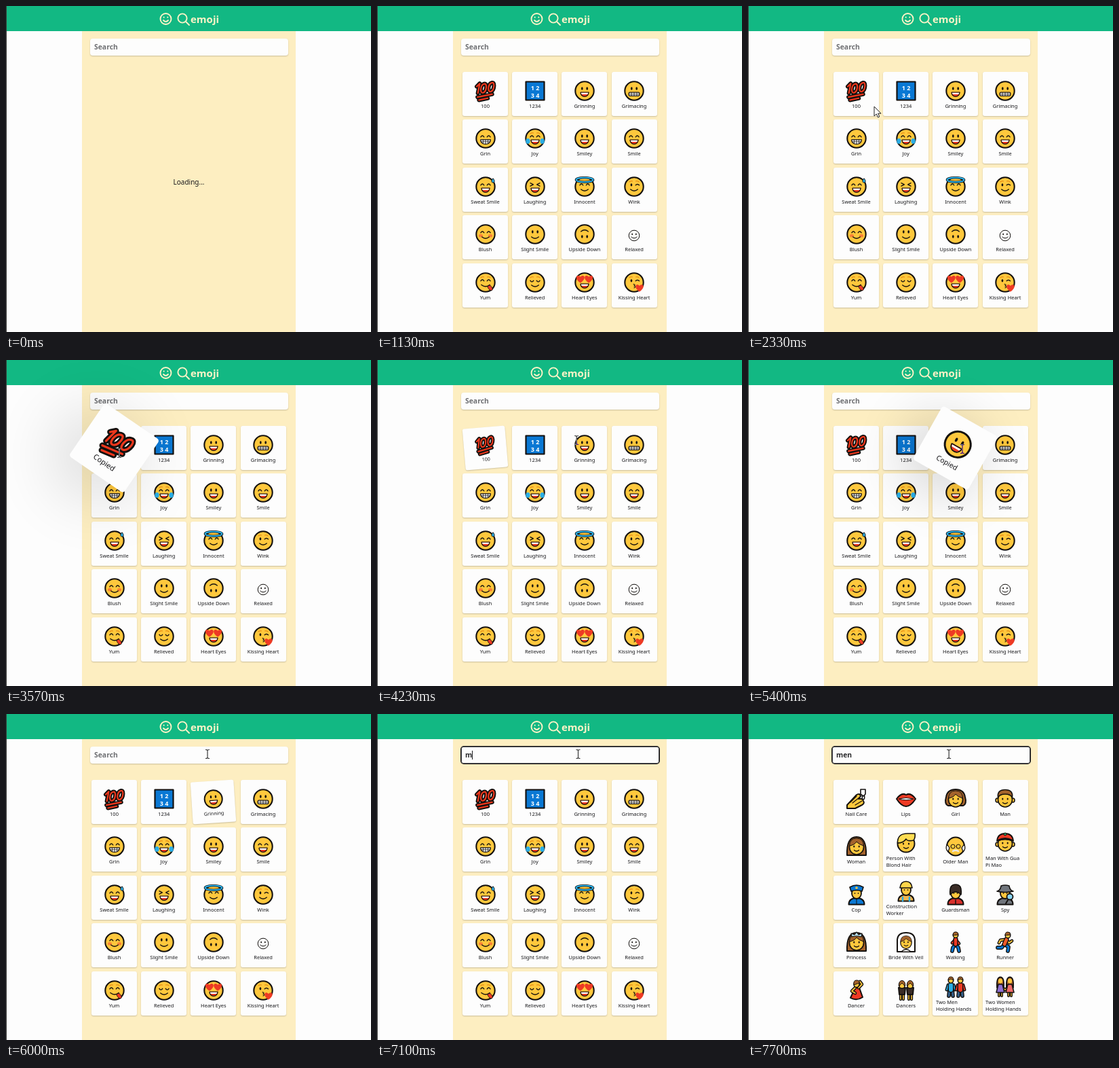
An HTML page that plays this animation: 538x480 px, repeating every 8 s.

```html
<!DOCTYPE html>
<html lang="en">
<head>
<meta charset="utf-8">
<title>Emoji search</title>
<style>
html, body { margin: 0; width: 100%; height: 100%; overflow: hidden; background: #fdfdfd; }
body { position: relative; font-family: "Noto Sans", "Open Sans", sans-serif; color: #17171a; }
body div, body > svg { position: absolute; }
#edge { left: 0; top: 0; width: 1px; height: 480px; background: #3a3a38; }
#header { left: 0; top: 0; width: 538px; height: 37px; background: #12b883; }
#column { left: 112px; top: 37px; width: 315px; height: 443px; background: #fdeec1; }
#search { left: 124px; top: 48px; width: 292px; height: 25px; border-radius: 4px; background: #fdfdfd;
  box-shadow: 0 1px 2px rgba(0,0,0,.2); font: 600 10.4px/25px "Noto Sans", "Open Sans", sans-serif; }
#search.focus { box-shadow: 0 0 0 1px #17171a, inset 0 0 0 .8px #17171a; }
#query { left: 6px; top: 0; white-space: pre; }
#caret { top: 6px; width: 1px; height: 13px; background: #17171a; }
#loading { left: 112px; width: 315px; top: 252px; text-align: center; font-size: 10px; line-height: 14px; }
.card { width: 67px; height: 65px; box-sizing: border-box; padding-top: 2px; border-radius: 3px; background: #fdfdfd;
  display: flex; flex-direction: column; align-items: center; justify-content: center; }
.card { box-shadow: 0 1px 2px rgba(0,0,0,.2); }
.card svg { width: 32px; height: 32px; margin-bottom: 1px; flex: none; overflow: visible; }
.card span { font-size: 7.5px; line-height: 10px; white-space: nowrap; }
.card .wide { width: 58px; }
#ibeam { mix-blend-mode: difference; }
#arrow, #ibeam { left: 0; top: 0; z-index: 5; overflow: visible; }
</style>
</head>
<body>
<div id="header"></div>
<svg width="538" height="37" fill="none" stroke="#fef3c7" stroke-width="1.9" stroke-linecap="round">
  <circle cx="235.5" cy="19" r="8"/>
  <path d="M232.7 16.5v.2M238.3 16.5v.2M232 21q3.5 4 7 0"/>
  <circle cx="260" cy="18" r="6.6"/><path d="M265 23l5 5"/>
  <text x="272" y="25" fill="#fef3c7" stroke="none" font-size="15" font-weight="700" font-family="Noto Sans, Open Sans, sans-serif">emoji</text>
</svg>
<div id="column"></div>
<div id="search"><div id="query"></div><div id="caret"></div></div>
<div id="loading">Loading...</div>
<div id="faces"></div>
<div id="people"></div>
<div id="edge"></div>
<svg id="arrow" width="12" height="18"><path d="M0 0V14L3.3 11L5.6 16L7.8 15L5.6 10.2H10z" fill="#fff" stroke="#222" stroke-linejoin="round"/></svg>
<svg id="ibeam" width="1" height="1"><path d="M-3-6.5Q0-6.5 0-5Q0-6.5 3-6.5M0-5V5M-3 6.5Q0 6.5 0 5Q0 6.5 3 6.5" fill="none" stroke="#c4c4c4" stroke-width="1.2"/></svg>
<script>
const $ = id => document.getElementById(id);
const LOOP = 8000;
const ink = '#14110f', gold = '#ffc83d', skin = gold, brown = '#a4632c', dark = '#3a2c26';
const red = '#ee3a24', sky = '#2aaee6', navy = '#0a78d4', white = '#fff';

// Drawing helpers, all centred on 0,0 in a 32 unit box.
const line = (d, color = ink, w = 1.6) => `<path d="${d}" fill="none" stroke="${color}" stroke-width="${w}" stroke-linecap="round" stroke-linejoin="round"/>`;
const shape = (d, fill, w = 1.6) => `<path d="${d}" fill="${fill}" stroke="${ink}" stroke-width="${w}" stroke-linejoin="round"/>`;
const oval = (x, y, rx, ry, fill = ink, w = 0) => `<ellipse cx="${x}" cy="${y}" rx="${rx}" ry="${ry}" fill="${fill}" stroke="${ink}" stroke-width="${w}"/>`;
const limb = (d, color, w = 3) => line(d, ink, w + 2.8) + line(d, color, w);
const group = (transform, body) => `<g transform="${transform}">${body}</g>`;
const heart = (x, y, s = 1) => group(`translate(${x} ${y}) scale(${s})`, `<path d="M0 5C-9-1-4-7 0-2.5C4-7 9-1 0 5z" fill="${red}"/>`);

const face = (...parts) => oval(0, 0, 13.7, 13.7, gold, 2.1) + group('scale(.88)', parts.join(''));
const eyes = oval(-4.2, -4, 1.5, 2.6) + oval(4.2, -4, 1.5, 2.6);
const arcs = line('M-8-2.5q2.7-4 5.4 0M2.6-2.5q2.7-4 5.4 0');
const lids = line('M-8-3q2.7 4 5.4 0M2.6-3q2.7 4 5.4 0');
const brows = line('M-8-8q3-2 5-1M8-8q-3-2-5-1', '#e8860c', 1.3);
const smile = line('M-6 4.5Q0 9.5 6 4.5');
const laugh = shape('M-7 2.5H7Q6 9.5 0 9.5T-7 2.5', red, 1.4) + `<path d="M-6 3.2H6L5 5.6H-5z" fill="#fff"/>`;
const teeth = shape('M-8.5 2H8.5Q8 9.5 0 9.5T-8.5 2', white, 1.4) + line('M-7.5 5.5H7.5M-4 2.5V8.5M0 2.5V9M4 2.5V8.5', ink, .9);
const wink = oval(-4.6, -3, 1.5, 2.5) + line('M2.5-2.5q3-3 6 0');
const cheeks = oval(-8, 2.5, 3.4, 2.6, '#fb8136') + oval(8, 2.5, 3.4, 2.6, '#fb8136');
const drop = (x, y) => shape(`M${x} ${y}q5 6 0 7.5q-5-1.5 0-7.5z`, sky, 1);
const numeral = 'M-12-6l4-4-2.5 13M-2-9.5q-4 1-4.500 7.500q0 5 3 4.500q4-1 4.500-8q0-5-3-4M8.500-11q-4 1-4.500 7.500q0 5 3 4.500q4-1 4.500-8q0-5-3-4M-11 8.500L9 4.500M-9 12.500L3 10';
const digits = (y, s) => `<text y="${y}" text-anchor="middle" font-size="9" font-weight="600" fill="#fff">${s}</text>`;

const faces = [
  ['100', group('scale(1.08)', line(numeral, ink, 5.6) + line(numeral, '#f0371c', 2))],
  ['1234', shape('M-13.5-13.5H13.5V13.5H-13.5z', navy, 2.2) + digits(-1, '1 2') + digits(9.5, '3 4')],
  ['Grinning', face(eyes, laugh)],
  ['Grimacing', face(eyes, shape('M-7 2.5H7Q9 2.5 9 5.5T7 8.5H-7Q-9 8.5-9 5.5T-7 2.5z', white, 1.4), line('M-8 5.5H8M-4.5 3V8M0 3V8M4.5 3V8', ink, .9))],
  ['Grin', face(arcs, teeth)],
  ['Joy', face(brows, arcs, laugh, oval(-12, 4.5, 3.6, 4.4, sky), oval(12, 4.5, 3.6, 4.4, sky))],
  ['Smiley', face(eyes, laugh)],
  ['Smile', face(arcs, laugh)],
  ['Sweat Smile', face(arcs, laugh, drop(12.5, -14))],
  ['Laughing', face(line('M-8-6l5 2.5-5 2.5M8-6l-5 2.5 5 2.5'), laugh)],
  ['Innocent', face(arcs, smile) + `<ellipse cy="-10" rx="12.5" ry="3.2" fill="none" stroke="${ink}" stroke-width="3.6"/><ellipse cy="-10" rx="12.5" ry="3.2" fill="none" stroke="${sky}" stroke-width="1.9"/>`],
  ['Wink', face(brows, wink, smile)],
  ['Blush', face(cheeks, arcs, smile)],
  ['Slight Smile', face(eyes, smile)],
  ['Upside Down', group('rotate(180)', face(eyes, smile))],
  ['Relaxed', `<circle cy="2" r="7.8" fill="none" stroke="${ink}"/>` + oval(-2.8, 0, .9, 1.2) + oval(2.8, 0, .9, 1.2) + line('M-4.2 4q4.2 4 8.4 0', ink, 1)],
  ['Yum', face(brows, arcs, line('M-7 4Q0 9.5 7 4'), shape('M3 6.5L7.5 4.5Q14 11 10.5 13.5Q6 14 3 6.5z', red, 1))],
  ['Relieved', face(brows, lids, smile)],
  ['Heart Eyes', face(laugh, heart(-7, -6, 1.35), heart(7, -6, 1.35))],
  ['Kissing Heart', face(brows, wink, line('M-1 3q4 1 1 3q4 1 0 3', ink, 1.3), heart(9, 9, 1.3))]
];

const head = (hair, ...front) => hair + oval(0, 1, 10.5, 11, skin, 1.6) + oval(-3.7, 0, 1.1, 1.6) + oval(3.7, 0, 1.1, 1.6) + line('M-3.5 5.5q3.5 3 7 0', ink, 1.3) + front.join('');
const bust = (coat, ...front) => shape('M-11.5 14.5Q-11.5 5 0 5T11.5 14.5z', coat, 2) + oval(0, -2, 7, 8, skin, 1.8) + oval(-2.5, -2, .8, 1) + oval(2.5, -2, .8, 1) + front.join('');
const longHair = shape('M-14 13Q-15-14 0-14T14 13z', brown, 2);
const ears = oval(-11.5, 2, 2.5, 3, skin, 1.5) + oval(11.5, 2, 2.5, 3, skin, 1.5);
const fringe = (color = brown) => shape(`M-10.5-1Q-10-12 0-12T10.5-1Q3-3 0-7Q-3-2-10.5-1z`, color, 1);
const walker = (x, top, hair) => group(`translate(${x} 0)`,
  limb('M-2 4L-3 13M2 4L3 13', '#35608c') + limb('M-4-3L-6 4M4-3L6 4', top, 2) + limb('M0-3V4', top, 6) + oval(0, -10, 3.8, 4.2, skin, 1.5) + shape('M-3.8-10Q-4-15 0-15T3.8-10L0-12z', hair, 1));
const dress = (x, color) => group(`translate(${x} 0)`, limb('M-2 8V13M2 8V13', skin, 1.2) + shape('M-5 1Q-6-14.5 0-14.5T5 1z', brown, 1.8) + shape('M-3-4H3L6 8H-6z', color) + oval(0, -9, 3, 3.5, skin));
const dancer = x => group(`translate(${x} 0)`, limb('M-2 5V13M2 5V13', skin, 1.5) + shape('M-5-4H5L4 6H-4z', dark, 2) + oval(0, -8, 4.5, 5, skin, 1.5) + shape('M-4.5-6Q-5-14.5 0-14.5T4.5-6L0-11z', brown, 1));

const people = [
  ['Nail Care', shape('M-14 9L0-6Q5-9 6-4L3 0Q9-1 10 3Q13 7 6 10L-2 14H-14z', skin, 2) + line('M-6 6L4-2M-2 9L8 3M-9 5L0-4', ink, 1.2) + limb('M10-4V-1', '#ddd', 2) + shape('M6-7V-14H13V-7L10-4z', white)],
  ['Lips', shape('M-14 0Q-7-10 0-6Q7-10 14 0Q7 11 0 11T-14 0z', red, 2) + shape('M-11 0Q0-3 11 0Q0 3.5-11 0z', white, 1)],
  ['Girl', head(shape('M-11 10Q-17 8-14-3Q-12-14 0-14T14-3Q17 8 11 10z', brown, 2), fringe())],
  ['Man', head(ears, shape('M-10.5-2Q-12-13.5 0-13.5T10.5-2Q8-7 0-7T-10.5-2z', brown))],
  ['Woman', head(longHair, fringe())],
  ['Person With|Blond Hair', oval(0, 1, 12.5, 12.5, skin, 2) + oval(-4, 1, 1.1, 1.6) + oval(4, 1, 1.1, 1.6) + line('M-3.5 6.5q3.5 3 7 0', ink, 1.3) + shape('M-12.5 0Q-13-14 2-14H13Q14-8 11-4Q2-2 0-6Q-4 0-12.5 0z', '#ffdc52')],
  ['Older Man', oval(0, 0, 13, 13.5, skin, 2) + shape('M-12.5-3Q-16 3-11 8L-9 2zM12.5-3Q16 3 11 8L9 2z', '#eceae6', 1.2) + line('M-7 0a3 3 0 1 0 6 0a3 3 0 1 0-6 0M1 0a3 3 0 1 0 6 0a3 3 0 1 0-6 0', ink, 1) + line('M-4 7Q0 4.500 4 7', '#eceae6', 2.4)],
  ['Man With Gua|Pi Mao', head(ears, shape('M-12-3Q-11-14 0-14T12-3Q0-8-12-3z', red, 1.8), line('M-10-4Q0-9 10-4', ink, 3), oval(0, -13, 2, 2, '#2a9d5c', 1))],
  ['Cop', bust(navy, shape('M-8-5L-10-11Q0-17 10-11L8-5Q0-8-8-5z', navy), oval(0, -10, 1.8, 1.8, gold), line('M0 7V14', ink, 1))],
  ['Construction|Worker', bust('#f0b450', shape('M-9-5Q-8-14.5 0-14.5T9-5z', '#ffd54a'), line('M-5 9V14M5 9V14', sky, 2.5))],
  ['Guardsman', bust('#d9302c', shape('M-8 0Q-10-15 0-15T8 0Q4-4 0-4T-8 0z', dark), line('M0 8V14', ink, 1.5))],
  ['Spy', bust('#70757c', shape('M-12-5Q-7-6-6-13Q0-15 6-13Q7-6 12-5Q0-2-12-5z', '#70757c'), line('M4 8L1 13', ink, 2), oval(7, 3, 4.5, 4.5, '#8ad6f4', 1.8))],
  ['Princess', head(longHair, fringe(), shape('M-7-8L-8-13L-3-11L0-15L3-11L8-13L7-8Q0-10-7-8z', '#b8dfee', 1.2))],
  ['Bride With Veil', shape('M-13 14V-4Q-12-14 0-14T13-4V14z', white, 2) + group('scale(.78)', head('', fringe())) + shape('M-7 14Q0 7 7 14z', white, 1.2)],
  ['Walking', limb('M0 3L-4 8L-5 13M0 3L4 8L5 13', navy) + limb('M0-4L-5 1M0-4L5 2', red, 2) + limb('M0-4V3', red, 4.5) + oval(0, -10.5, 3.8, 4, skin, 1.5) + shape('M-3.8-10Q-4-15 0-15T3.8-11z', brown, 1)],
  ['Runner', limb('M-1 3L5 7L4 13M-1 3L-5 8L-11 8', navy) + limb('M1-4L-7-3L-9 1M1-4L6 1L10-2', skin, 2) + limb('M2-4L-1 3', '#f05a28', 4.5) + oval(4, -10, 3.8, 4, skin, 1.5) + shape('M0-10Q0-15 4-15T8-11z', brown, 1)],
  ['Dancer', shape('M-2-4H4L9 10Q0 16-9 11z', red, 2) + limb('M3-4L8-9L5-13M-2-4L-7 1L-2 4', skin, 1.8) + oval(0, -9, 4, 4.5, skin, 1.5) + shape('M-4-8Q-5-15 0-15T4-11z', brown, 1)],
  ['Dancers', dancer(-6) + dancer(6)],
  ['Two Men|Holding Hands', walker(-7, sky, brown) + walker(7, red, brown)],
  ['Two Women|Holding Hands', limb('M-5 0L0 4L5 0', skin, 1.5) + dress(-7, '#8f6fd0') + dress(7, '#ef6a6a')]
];

function fillGrid(id, items) {
  $(id).innerHTML = items.map(([label, art], i) => {
    const left = 126 + 73.2 * (i % 4), top = 97 + 70.4 * Math.floor(i / 4);
    const wide = label.includes('|') ? ' class="wide"' : '';
    return `<div class="card" style="left:${left}px;top:${top}px"><svg viewBox="-16 -16 32 32">${art}</svg><span${wide}>${label.replace('|', '<br>')}</span></div>`;
  }).join('');
}
fillGrid('faces', faces);
fillGrid('people', people);

const clamp = u => Math.min(1, Math.max(0, u));

// Underdamped spring from 0 to 1: stiffness 100, damping 10, mass 1.
function spring(ms) {
  if (ms <= 0) return 0;
  const s = ms / 1000, w = Math.sqrt(75);
  return 1 - Math.exp(-5 * s) * (Math.cos(w * s) + 5 / w * Math.sin(w * s));
}

const clicks = [
  { card: 0, copied: 3085, rise: 3250, fall: 3860 },
  { card: 2, copied: 4740, rise: 4750, fall: 5560 }
];
const typed = [[7100, 'm'], [7170, 'me'], [7250, 'men']];
const path = [[1570, 80, 0], [1900, 140, 80], [2200, 184, 142], [2330, 186, 148], [2400, 186, 148],
  [2700, 167, 137], [3870, 167, 137], [4230, 294, 118], [4400, 320, 122], [4670, 316, 131],
  [5570, 316, 131], [5950, 297, 59], [6230, 297, 59], [LOOP, 296, 59]];

const show = (id, on) => { $(id).style.visibility = on ? 'visible' : 'hidden'; };

function drawCards(t) {
  for (const { card, copied, rise, fall } of clicks) {
    const el = $('faces').children[card];
    const k = spring(t - rise) - spring(t - fall);
    const lift = Math.max(0, k);
    el.style.transform = Math.abs(k) > .002 ? `rotate(${30 * k}deg) scale(${1 + .4 * k})` : 'none';
    el.style.zIndex = lift > .002 ? 2 : 0;
    el.style.boxShadow = `${-8 * lift}px ${1 + 13 * lift}px ${2 + 58 * lift}px rgba(0,0,0,.2)`;
    el.lastChild.textContent = t >= copied && t < fall ? 'Copied' : faces[card][0];
  }
}

function drawSearch(t) {
  const text = typed.reduce((now, [at, value]) => t >= at ? value : now, '');
  $('query').textContent = text || 'Search';
  $('query').style.color = text ? '#2b2b2d' : '#6f7073';
  $('search').className = t >= 6200 ? 'focus' : '';
  $('caret').style.left = 6 + (text ? $('query').offsetWidth : 0) + 'px';
  show('caret', (t >= 6200 && t < 6700) || (t >= 7100 && t < 7700));
}

function drawCursor(t) {
  const i = Math.max(1, path.findIndex(p => p[0] > t));
  const [t0, x0, y0] = path[i - 1], [t1, x1, y1] = path[i];
  const u = clamp((t - t0) / (t1 - t0));
  const x = x0 + (x1 - x0) * u, y = y0 + (y1 - y0) * u;
  const overInput = x > 124 && x < 416 && y > 48 && y < 73;
  const overGlyph = y > 110 && y < 141 && [0, 1, 2, 3].some(c => Math.abs(x - 159.5 - 73.2 * c) < 16);
  const beam = overInput || overGlyph;
  show('ibeam', t >= 1570 && beam);
  show('arrow', t >= 1570 && !beam);
  $(beam ? 'ibeam' : 'arrow').style.transform = `translate(${x}px, ${y}px)`;
}

function draw(t) {
  show('loading', t < 1070);
  show('faces', t >= 1070 && t < 7280);
  show('people', t >= 7280);
  drawCards(t);
  drawSearch(t);
  drawCursor(t);
}

const start = performance.now();
function tick() {
  draw((performance.now() - start) % LOOP);
  requestAnimationFrame(tick);
}
tick();
</script>
</body>
</html>
```
